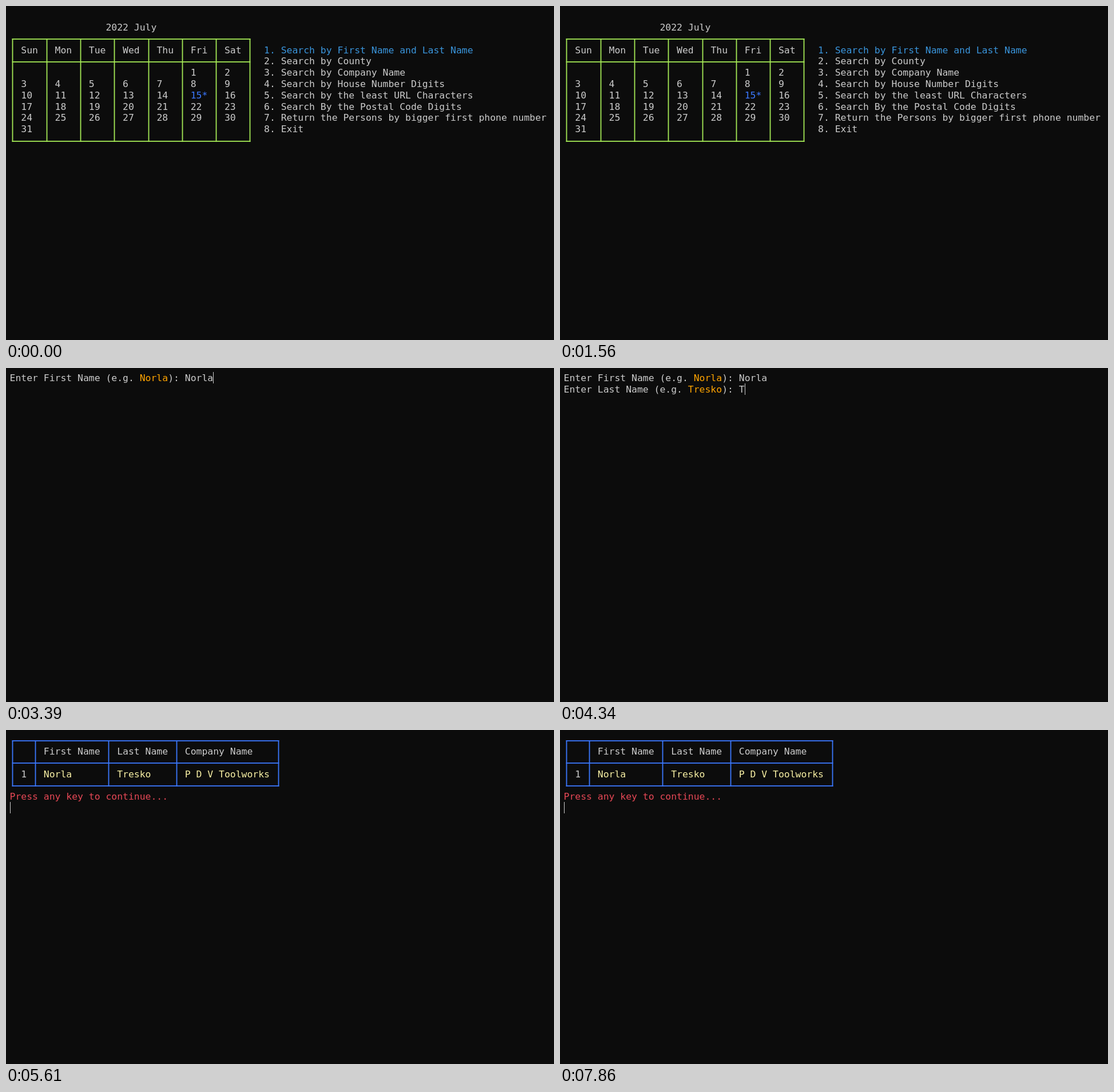
Write an HTML page with a canvas that moves like this. It is 958 px wide and 585 px high and loops after 8 s.

```html
<!DOCTYPE html>
<html lang="en">
<head>
<meta charset="utf-8">
<title>Terminal search</title>
<style>
  html, body { margin: 0; width: 100%; height: 100%; overflow: hidden; background: #0c0c0c; }
  canvas { display: block; }
</style>
</head>
<body>
<canvas id="screen" width="958" height="585"></canvas>
<script>
const ctx = document.getElementById('screen').getContext('2d');
const LOOP = 8000;
const CELL_W = 9.88, CELL_H = 19.8, LEFT = 6.5, TOP = 7.3;
const COLOR = {
  back: '#0c0c0c', text: '#cccccc', green: '#a5ea55', blue: '#3b78ff',
  cyan: '#3a96dd', orange: '#ffa500', yellow: '#f9f1a5', red: '#e74856'
};

const MENU = [
  'Search by First Name and Last Name',
  'Search by County',
  'Search by Company Name',
  'Search by House Number Digits',
  'Search by the least URL Characters',
  'Search By the Postal Code Digits',
  'Return the Persons by bigger first phone number',
  'Exit'
];
const FIRST = 'Norla', LAST = 'Tresko', COMPANY = 'P D V Toolworks';

// Times at which each letter appears
const FIRST_KEYS = [2810, 2940, 3200, 3290, 3390];
const LAST_KEYS = [4340, 4460, 4590, 4810, 5080, 5210];

function write(text, col, row, color = COLOR.text) {
  ctx.fillStyle = color;
  ctx.fillText(text, LEFT + col * CELL_W, 23.1 + row * CELL_H);
}

function cursor(col, row) {
  ctx.fillStyle = COLOR.text;
  ctx.fillRect(Math.round(LEFT + 0.1 + col * CELL_W), Math.round(TOP + row * CELL_H), 1, 20);
}

function grid(cols, rows, color) {
  const xs = cols.map(c => Math.round(LEFT + (c + 0.5) * CELL_W));
  const ys = rows.map(r => Math.round(18.7 + r * CELL_H));
  const [x0, x1, y0, y1] = [xs[0], xs.at(-1), ys[0], ys.at(-1)];
  ctx.fillStyle = color;
  for (const x of xs) ctx.fillRect(x - 0.4, y0 - 1, 1.8, y1 - y0 + 2);
  for (const y of ys) ctx.fillRect(x0 - 0.4, y - 1, x1 - x0 + 1.8, 1.8);
}

function drawMenu(selected) {
  write('2022 July', 17, 1);
  grid([0, 6, 12, 18, 24, 30, 36, 42], [2, 4, 11], COLOR.green);
  ['Sun', 'Mon', 'Tue', 'Wed', 'Thu', 'Fri', 'Sat'].forEach((day, i) => write(day, 2 + 6 * i, 3));
  for (let date = 1; date <= 31; date++) {
    const slot = date + 4, today = date === 15;
    write(today ? '15*' : String(date), 2 + 6 * (slot % 7), 5 + Math.floor(slot / 7),
      today ? COLOR.blue : COLOR.text);
  }
  MENU.forEach((item, i) =>
    write(`${i + 1}. ${item}`, 45, 3 + i, i === selected ? COLOR.cyan : COLOR.text));
}

function drawPrompt(label, example, keys, row, time, active) {
  const before = `Enter ${label} (e.g. `;
  const typed = example.slice(0, keys.filter(k => k <= time).length);
  const middle = before.length + example.length;
  write(before, 0, row);
  write(example, before.length, row, COLOR.orange);
  write('): ' + typed, middle, row);
  if (active) cursor(middle + 3 + typed.length, row);
}

function drawResult(time) {
  grid([0, 4, 17, 29, 47], [0, 2, 4], COLOR.blue);
  write('First Name', 6, 1);
  write('Last Name', 19, 1);
  write('Company Name', 31, 1);
  write('1', 2, 3);
  write(FIRST, 6, 3, COLOR.yellow);
  write(LAST, 19, 3, COLOR.yellow);
  write(COMPANY, 31, 3, COLOR.yellow);
  write('Press any key to continue...', 0, 5, COLOR.red);
  const blinks = [6210, 6740, 7320, 7860].filter(t => t <= time).length;
  if (blinks % 2 === 0) cursor(0, 6);
}

function draw(time) {
  ctx.fillStyle = COLOR.back;
  ctx.fillRect(0, 0, 958, 585);
  ctx.font = '16.41px "DejaVu Sans Mono", monospace';
  if (time < 1960) {
    drawMenu(time >= 500 && time < 1560 ? 1 : 0);
  } else if (time < 5610) {
    const second = time >= 3660;
    drawPrompt('First Name', FIRST, FIRST_KEYS, 0, time, !second);
    if (second) drawPrompt('Last Name', LAST, LAST_KEYS, 1, time, true);
  } else {
    drawResult(time);
  }
}

const start = performance.now();
function tick() {
  draw((performance.now() - start) % LOOP);
  requestAnimationFrame(tick);
}
tick();
</script>
</body>
</html>
```
